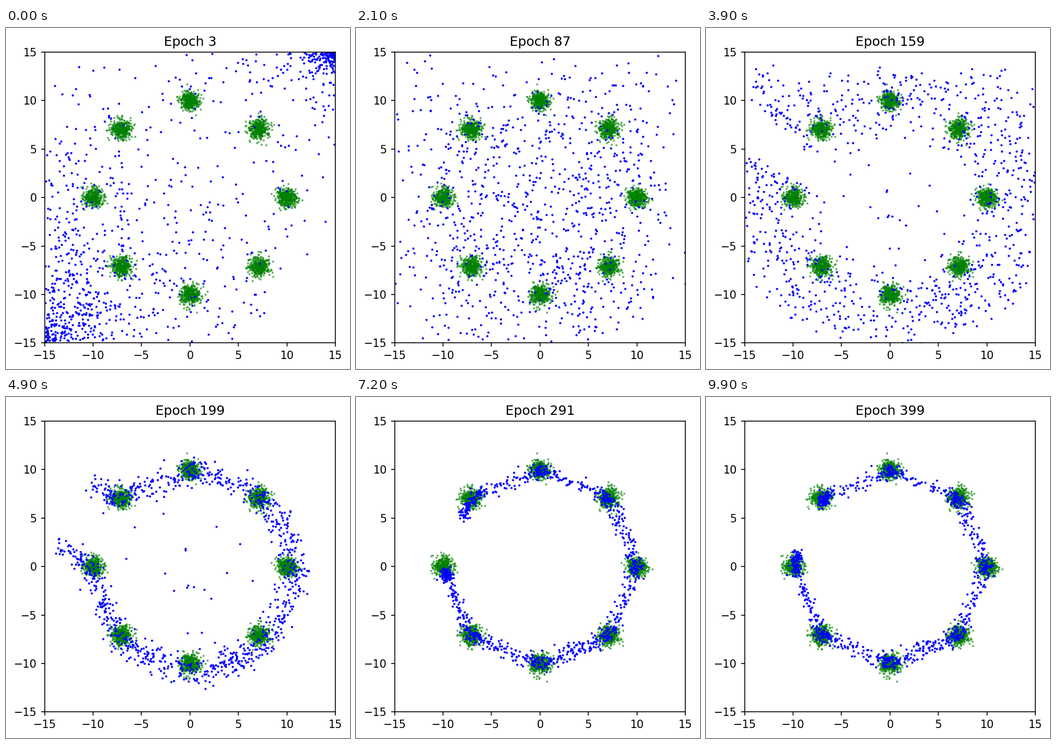
These frames come from a looping animation (656 by 650 pixels, 10000 ms). A matplotlib script:

```python
import numpy as np
import matplotlib.pyplot as plt
from matplotlib.animation import FuncAnimation

DPI, W, H = 150, 656, 650
FRAMES, INTERVAL = 100, 100
N_FAKE, N_REAL, SIGMA = 1000, 400, 0.5
SWELL, JITTER = 0.2, 0.05

rng = np.random.default_rng(8)


def noise(n, source=rng):
    return source.normal(size=n) + 1j * source.normal(size=n)


# Real data: eight Gaussians on a circle of radius 10
centers = 10 * np.exp(1j * np.pi / 4 * np.arange(8))
real = np.repeat(centers, N_REAL) + SIGMA * noise(8 * N_REAL)

# Latent noise: z sets the large shape, eps the local scatter
z1, z2 = rng.normal(size=(2, N_FAKE))
eps = noise(N_FAKE)
rho = np.hypot(z1, z2)
turn = np.arctan2(z2, z1) / (2 * np.pi)       # clockwise from north
along = (turn + 67.5 / 360) % 1 * 8 - 0.5     # whole numbers are clusters


def corners():
    u = -0.4 + 0.78 * z1 + 1.4 / (1 + np.exp(-6 * (z1 - 0.75)))
    v = -0.08 + 0.45 * z2
    return 15 * (np.tanh(u + v) + 1j * np.tanh(u - v))


def blob():
    x = -0.4 + 0.9 * z1 + 3.7 * z2
    return x + 15j * np.tanh((6 * z1 - 1.8) / 14)


def bowl():
    x = 15.4 * np.tanh(0.8 * z2)
    return x + 1j * (12.8 * np.tanh(0.75 * z1) - 0.8 + 0.014 * x ** 2)


def ring(radius, dip, pull, spread, start, end):
    """Open ring from start to end that sags and thins out between clusters."""
    t = along - pull * np.sin(2 * np.pi * along) / (2 * np.pi)
    t = np.clip(t, start, end)
    r = radius - dip * np.sin(np.pi * t) ** 2
    width = spread * (0.8 + 0.5 * np.sin(np.pi * (t + 0.5) / 8))
    return r * np.exp(1j * np.pi / 4 * (3 - t)) + width * eps


def flared_ring():
    flare = (np.abs(along - 3.5) / 4) ** 16
    inner = np.clip(rho / 0.25, 0.2, 1)
    pos = ring(10.3, 0.4, 0.1, 0.65, -0.05, 7)
    return (pos + 0.5 - 0.5j + flare * (-4 + 3j)) * inner


steps = [0, 12, 30, 49, 63, 82, 99]
poses = [corners(), blob(), bowl(), flared_ring(),
         ring(9.9, 0.5, 0.5, 0.36, -0.3, 6.8),
         ring(9.8, 0.7, 0.75, 0.36, -0.15, 7),
         ring(9.8, 0.7, 0.88, 0.36, 0, 7.15)]


def generated(i):
    k = min(np.searchsorted(steps, i, side="right"), len(steps) - 1) - 1
    p = (i - steps[k]) / (steps[k + 1] - steps[k])
    pos = (1 - p) * poses[k] + p * poses[k + 1]
    if k < 3:
        pos = pos * (1 + SWELL * np.sin(np.pi * p))
    return pos + JITTER * noise(N_FAKE, np.random.default_rng(i))


fig = plt.figure(figsize=((W + 0.01) / DPI, (H + 0.01) / DPI), dpi=DPI)
ax = fig.add_axes([73.58 / W, 49.58 / H, 554.4 / W, 554.4 / H])
ax.set(xlim=(-15, 15), ylim=(-15, 15),
       xticks=range(-15, 16, 5), yticks=range(-15, 16, 5))
ax.scatter(real.real, real.imag, s=1, c="g", alpha=0.5)
dots = ax.scatter(z1, z2, s=1, c="b")
title = ax.set_title("Epoch 3")


def update(i):
    pos = generated(i)
    dots.set_offsets(np.column_stack([pos.real, pos.imag]))
    title.set_text(f"Epoch {4 * i + 3}")
    return dots, title


anim = FuncAnimation(fig, update, frames=FRAMES, interval=INTERVAL,
                     repeat=True, repeat_delay=0, blit=False)
plt.show()
```
